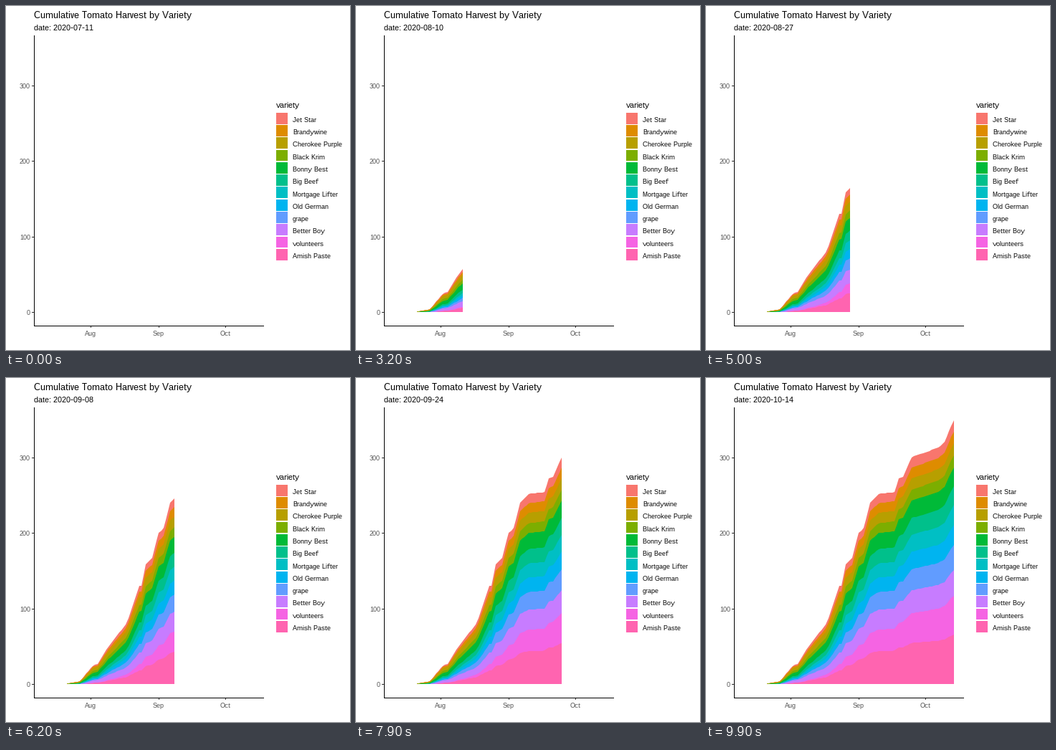
Recreate the animation shown at these times as a matplotlib script. Size 480x480 px, loop 10 s.

```python
import numpy as np
import matplotlib.pyplot as plt
from matplotlib.animation import FuncAnimation
from matplotlib.patches import Polygon, Rectangle

SIZE, FRAMES, SPAN, FIRST = 480, 100, 95, 10
START = np.datetime64("2020-07-11")
GREY = "#4D4D4D"

plt.rcParams.update({
    "font.family": "Liberation Sans",
    "text.hinting": "default",
    "text.hinting_factor": 1,
    "text.kerning_factor": 6,
    "toolbar": "None",
})

# Name, colour, final pounds, lateness (above 1 ripens after the average).
VARIETIES = [
    ("Jet Star", "#F8766D", 15.0, 0.72),
    ("Brandywine", "#DE8C00", 15.7, 0.72),
    ("Cherokee Purple", "#B79F00", 15.7, 0.47),
    ("Black Krim", "#7CAE00", 15.8, 0.65),
    ("Bonny Best", "#00BA38", 24.9, 0.57),
    ("Big Beef", "#00C08B", 25.0, 0.90),
    ("Mortgage Lifter", "#00BFC4", 26.3, 1.14),
    ("Old German", "#00B4F0", 26.7, 1.08),
    ("grape", "#619CFF", 32.4, 1.08),
    ("Better Boy", "#C77CFF", 34.0, 0.83),
    ("volunteers", "#F564E3", 51.6, 1.90),
    ("Amish Paste", "#FF64B0", 65.7, 1.30),
]

# Bends of the running total: day, pounds.
BENDS = [(10, 1), (16, 4), (22, 24.5), (24, 27), (29, 50), (37, 79),
         (43, 130), (44, 130.5), (46, 158.5), (49, 167), (52, 200.5),
         (54, 206.5), (57, 240), (61, 251.5), (68, 254), (70, 272),
         (72, 274.5), (76, 300), (88, 312.8), (91, 320), (95, 348.8)]


def to_x(day):
    return np.floor(54.35 + 3.07 * day)


def to_y(pounds):
    return np.floor(427.9 - 1.056 * pounds)


def stack_tops(days):
    """Upper edge of every layer, top layer first, in pounds."""
    total = np.interp(days, *zip(*BENDS))
    ripe = total / total[-1]
    parts = np.array([final * ripe ** late for *_, final, late in VARIETIES])
    parts *= total / parts.sum(axis=0)
    return np.cumsum(parts[::-1], axis=0)[::-1]


fig = plt.figure(figsize=(SIZE / 72, SIZE / 72), dpi=72, facecolor="white")
ax = fig.add_axes([0, 0, 1, 1])
ax.set(xlim=(0, SIZE), ylim=(SIZE, 0))
ax.axis("off")


def label(x, y, text, size, color="black", ha="left"):
    return ax.text(x, y, text, fontsize=size, color=color, ha=ha, va="baseline")


def box(x, y, width, height, color):
    ax.add_patch(Rectangle((x, y), width, height, fc=color, lw=0, zorder=3))


label(39, 17, "Cumulative Tomato Harvest by Variety", 13)
subtitle = label(39, 34, "", 11)

box(39, 41, 1, 406, "black")
box(39, 446, 321, 1, "black")
for pounds in range(0, 400, 100):
    y = to_y(pounds)
    box(36, y, 3, 1, "#333333")
    label(34, y + 4, str(pounds), 9, GREY, "right")
for month, day in (("Aug", 21), ("Sep", 52), ("Oct", 82)):
    x = to_x(day)
    box(x, 447, 1, 2, "#333333")
    label(x, 460, month, 9, GREY, "center")

label(377, 142, "variety", 11)
for row, (name, color, *_) in enumerate(VARIETIES):
    y = 149.2 + 17.28 * row
    top, bottom = np.floor([y, y + 15.86])
    box(377, top, 16, bottom - top, color)
    label(400, round(y + 12.7), name, 9)

days = np.arange(FIRST, SPAN + 1)
edge_x, edges_y = to_x(days), to_y(stack_tops(days))

# Each layer reaches down to zero and the next one covers its lower part.
areas = [ax.add_patch(Polygon([(0, 0)] * 3, fc=color, lw=0))
         for _, color, *_ in VARIETIES]


def draw(i):
    passed = SPAN * i / (FRAMES - 1)
    subtitle.set_text(f"date: {START + int(passed)}")
    n = max(0, int(passed + 0.5) - FIRST + 1)
    for area, edge_y in zip(areas, edges_y):
        area.set_visible(n > 1)
        if n > 1:
            xs = np.r_[edge_x[0], edge_x[:n], edge_x[n - 1]]
            ys = np.r_[to_y(0), edge_y[:n], to_y(0)]
            area.set_xy(np.c_[xs, ys])
    return [subtitle, *areas]


anim = FuncAnimation(fig, draw, frames=FRAMES, interval=100, repeat=True,
                     repeat_delay=0, blit=False)
plt.show()
```
